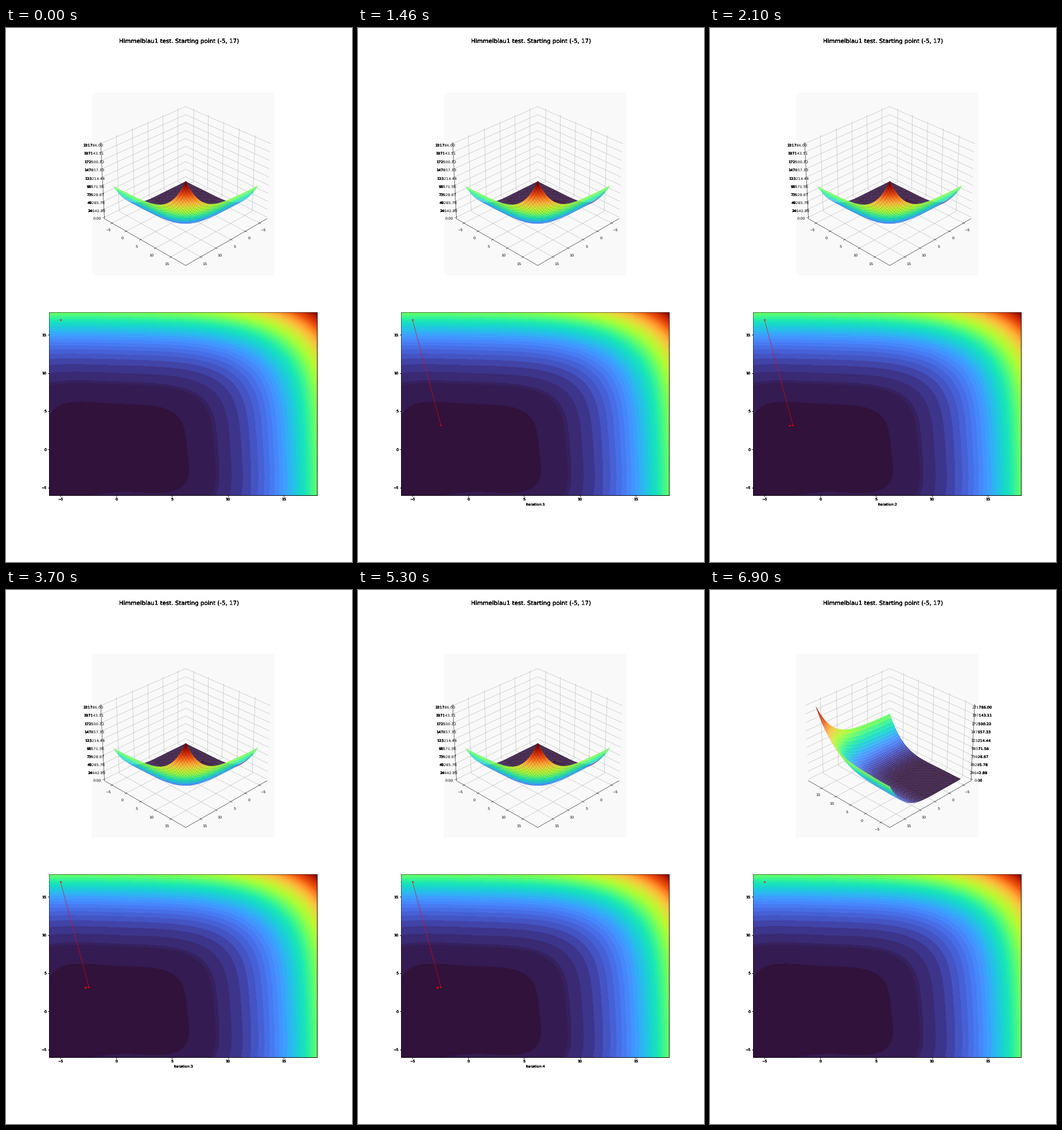
A matplotlib script for the animation above (8000 ms loop, 603x928 px).

```python
import numpy as np
import matplotlib.pyplot as plt
from matplotlib.animation import FuncAnimation

plt.rcParams.update({
    "font.family": "DejaVu Sans",
    "text.hinting": "none",
    "figure.subplot.bottom": 0.125,
    "figure.subplot.top": 0.88,
    "figure.subplot.right": 0.8993,
})

LOW, HIGH = -6, 18
TICKS = range(-5, 16, 5)
LAYERS = 4          # stacked copies darken the labels outside the axes
INTERVAL, LOOP = 100, 8000


def func(x, y):
    return (x**2 + y - 11)**2 + (x + y**2 - 7)**2


TOP = func(HIGH, HIGH)
PATH = np.array([(-5, 17), (-2.45, 3.17), (-2.79, 3.12),
                 (-2.805, 3.131), (-2.805, 3.131)])
STEP = TOP / 249
LEVELS = [0, STEP, 5 * STEP, 6 * STEP, *np.arange(10, 249, 5) * STEP, TOP]

# start time in ms, iterations done, azimuth of the camera
SCENES = [(0, 0, 45), (500, 1, 45), (2100, 2, 45),
          (3700, 3, 45), (5300, 4, 45), (6900, 0, 135)]
STARTS = [s[0] for s in SCENES]

fig = plt.figure(figsize=(13, 20), dpi=46.4, facecolor="white")


def grid(n):
    side = np.linspace(LOW, HIGH, n)
    return np.meshgrid(side, side)


def widen(lo, hi, share):
    pad = (hi - lo) * share
    return lo - pad, hi + pad


SIDE = widen(*widen(LOW, HIGH, 0.05), 1 / 48)
HEIGHT = widen(0, TOP, 1 / 48)


def axes_3d(azim):
    ax = fig.add_subplot(211, projection="3d", computed_zorder=False)
    ax.set_facecolor("#f9f9f9")
    ax.view_init(30, azim)
    ax.set(xticks=TICKS, yticks=TICKS, zticks=np.linspace(0, TOP, 10))
    ax.zaxis.set_major_formatter("{x:.2f}")
    for axis in (ax.xaxis, ax.yaxis, ax.zaxis):
        axis.set_pane_color((1, 1, 1, 0))
    ax.set(xlim=SIDE, ylim=SIDE, zlim=HEIGHT)
    return ax


def axes_2d(step):
    ax = fig.add_subplot(212)
    ax.set(xlim=(LOW, HIGH), ylim=(LOW, HIGH), xticks=TICKS, yticks=TICKS)
    if step:
        ax.set_xlabel(f"Iteration:{step}")
    return ax


def draw_surface(ax, points):
    x, y = grid(51)
    ax.plot_surface(x, y, func(x, y), cmap="turbo",
                    rstride=1, cstride=1, zorder=2)
    ax.plot(*points.T, func(*points.T), "r.", ms=5, zorder=1)
    for a, b in zip(points, points[1:]):
        px, py = np.linspace(a, b, 40).T
        ax.plot(px, py, func(px, py), "r-", lw=2, zorder=1)


def draw_map(ax, points):
    x, y = grid(301)
    ax.contourf(x, y, func(x, y), levels=LEVELS, cmap="turbo",
                vmin=0, vmax=TOP)
    ax.plot(*points.T, "r.-", lw=1, ms=6)


def render(step, azim):
    fig.clear()
    for _ in range(LAYERS):
        fig.text(0.5, 0.98, "Himmelblau1 test. Starting point (-5, 17)",
                 size=16, ha="center", va="top")
        top, bottom = axes_3d(azim), axes_2d(step)
    points = PATH[:step + 1]
    draw_surface(top, points)
    draw_map(bottom, points)
    # plotting must not disturb the limits
    top.set(xlim=SIDE, ylim=SIDE, zlim=HEIGHT)
    bottom.set(xlim=(LOW, HIGH), ylim=(LOW, HIGH))
    fig.canvas.draw()
    return np.array(fig.canvas.buffer_rgba())


# each scene is static, so it is rendered once and then only shown
shots = [render(step, azim) for _, step, azim in SCENES]
fig.clear()
screen = fig.figimage(shots[0], origin="upper")


def update(i):
    scene = np.searchsorted(STARTS, i * INTERVAL, side="right") - 1
    screen.set_data(shots[scene])
    return [screen]


anim = FuncAnimation(fig, update, frames=LOOP // INTERVAL,
                     interval=INTERVAL, repeat=True, repeat_delay=0)
plt.show()
```
